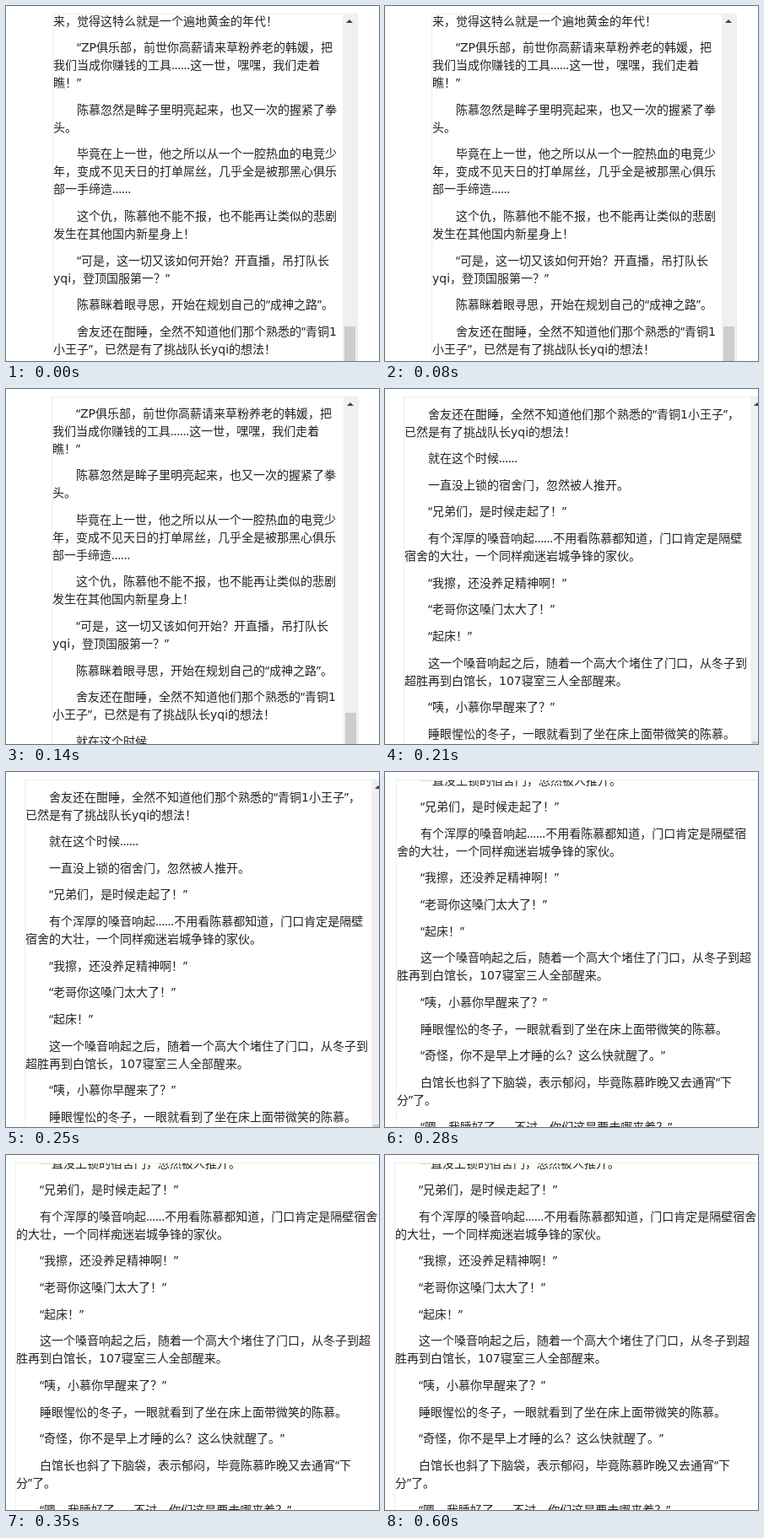
Recreate the animation shown at these times as an HTML page. Size 442 by 421 pixels, loop 770 ms.

```html
<!DOCTYPE html>
<html lang="zh-CN">
<head>
<meta charset="utf-8">
<style>
  html, body { margin: 0; width: 100%; height: 100%; overflow: hidden; background: #fff; }
  #stage { position: relative; width: 100%; height: 100%; overflow: hidden; contain: strict; }
  #box { position: absolute; top: 9px; bottom: 0; border: 1px solid #eee; border-bottom: 0; overflow: hidden; }
  #text {
    position: absolute; left: 0; color: #222;
    font: 14px/21px "Noto Sans", "Noto Sans CJK SC", "Noto Sans CJK", sans-serif;
    text-spacing-trim: space-all;
  }
  p { margin: 0 0 8pt; text-indent: 28px; }
  p.tail { text-indent: 0; }
  b { font: 14px/0 "DejaVu Sans", sans-serif; }
  .keep { white-space: nowrap; }
  #bar { position: absolute; top: 0; right: 0; width: 17px; height: 100%; background: #f0f0f0; }
  #arrow {
    position: absolute; left: 4px; top: 6px;
    border: solid transparent; border-width: 0 4.5px 4px; border-bottom-color: #444;
  }
  #thumb { position: absolute; left: 2px; bottom: 0; width: 13px; background: #cdcdcd; }
</style>
</head>
<body>
<div id="stage">
  <div id="box">
    <div id="text"></div>
    <div id="bar"><div id="arrow"></div><div id="thumb"></div></div>
  </div>
</div>
<script>
const story = `来，觉得这特么就是一个遍地黄金的年代！
“ZP俱乐部，前世你高薪请来草粉养老的韩媛，把我们当成你赚钱的工具……这一世，嘿嘿，我们走着瞧！”
陈慕忽然是眸子里明亮起来，也又一次的握紧了拳头。
毕竟在上一世，他之所以从一个一腔热血的电竞少年，变成不见天日的打单屌丝，几乎全是被那黑心俱乐部一手缔造……
这个仇，陈慕他不能不报，也不能再让类似的悲剧发生在其他国内新星身上！
“可是，这一切又该如何开始？开直播，吊打队长yqi，登顶国服第一？”
陈慕眯着眼寻思，开始在规划自己的“成神之路”。
舍友还在酣睡，全然不知道他们那个熟悉的“青铜1小王子”，已然是有了挑战队长yqi的想法！
就在这个时候……
一直没上锁的宿舍门，忽然被人推开。
“兄弟们，是时候走起了！”
有个浑厚的嗓音响起……不用看陈慕都知道，门口肯定是隔壁宿舍的大壮，一个同样痴迷岩城争锋的家伙。
“我擦，还没养足精神啊！”
“老哥你这嗓门太大了！”
“起床！”
这一个嗓音响起之后，随着一个高大个堵住了门口，从冬子到超胜再到白馆长，107寝室三人全部醒来。
“咦，小慕你早醒来了？”
睡眼惺忪的冬子，一眼就看到了坐在床上面带微笑的陈慕。
“奇怪，你不是早上才睡的么？这么快就醒了。”
白馆长也斜了下脑袋，表示郁闷，毕竟陈慕昨晚又去通宵“下分”了。
“嗯，我睡好了……不过，你们这是要去哪来着？”`;

const paragraphs = story.split('\n').map((line, i) =>
  `<p${i ? '' : ' class="tail"'}>` +
  line.replace(/[A-Za-z0-9]+/g, '<b>$&</b>')
      .replace('分”了。', '<span class="keep">$&</span>') + '</p>');

// The reader is dragged wider while it scrolls; every pose is a hard cut.
const poses = [
  { until: 140, left: 55, barX: 399, first: 0, top: -3.5, thumbSize: 41 },
  { until: 210, left: 54, barX: 400, first: 1, top: 7.5, thumbSize: 37 },
  { until: 280, left: 22, barX: 433, first: 7, top: 8.5, thumbSize: 3 },
  { until: 350, left: 13, barX: 441, first: 9, top: -11.5, thumbSize: 0 },
  { until: 770, left: 11, barX: 444, first: 9, top: -11.5, thumbSize: 0 },
];
const LOOP = 770;
const [box, text, thumb] = ['box', 'text', 'thumb'].map(id => document.getElementById(id));
let shown;

function show(pose) {
  const { left, barX, first, top, thumbSize } = pose;
  const width = barX - left - 1;
  box.style.left = left + 'px';
  box.style.width = width + 17 + 'px';
  text.style.width = width + 'px';
  text.style.top = top + 'px';
  text.innerHTML = paragraphs.slice(first).join('');
  thumb.style.height = thumbSize + 'px';
  shown = pose;
}

const start = performance.now();
function tick() {
  const time = (performance.now() - start) % LOOP;
  const pose = poses.find(p => time < p.until);
  if (pose !== shown) show(pose);
  requestAnimationFrame(tick);
}
tick();
</script>
</body>
</html>
```
